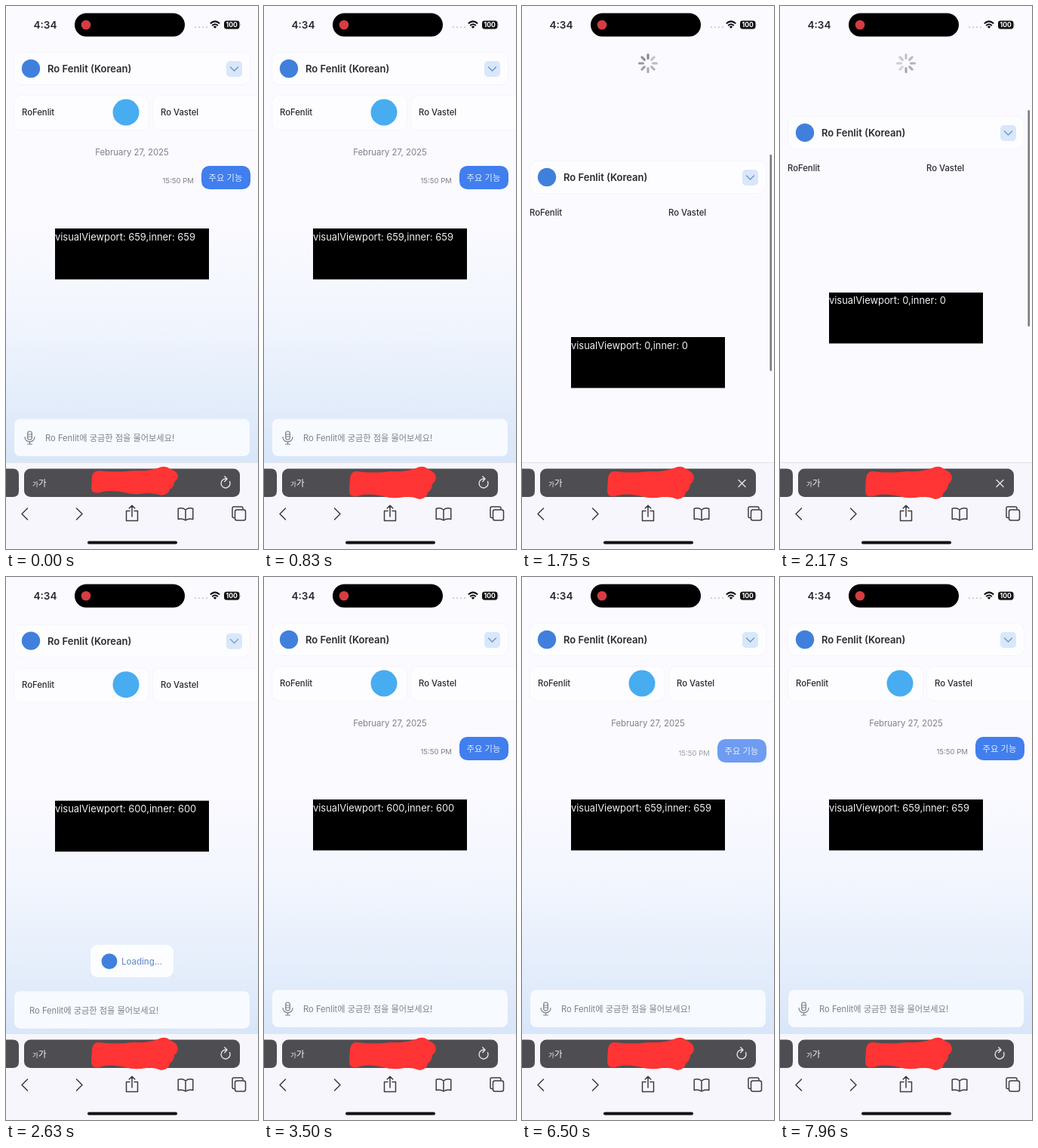
An HTML page for the animation above (8 s loop, 334x720 px).

```html
<!DOCTYPE html>
<html lang="en">
<head>
<meta charset="utf-8">
<title>Pull to refresh</title>
<style>
html, body { margin: 0; width: 100%; height: 100%; overflow: hidden; background: #fafaff; }
svg { display: block; width: 100vw; height: 100vh; }
text { font-family: Inter, "Noto Sans CJK KR", "Noto Sans CJK", sans-serif; fill: #2a2a2e; }
.line { fill: none; stroke: #3c3c40; stroke-width: 1.5; stroke-linecap: round; stroke-linejoin: round; }
.card { fill: #fdfdff; stroke: #f5f5fb; }
.name { font-size: 11.3px; font-weight: 500; }
.muted { fill: #808088; }
</style>
</head>
<body>
<svg viewBox="0 0 334 720">
  <defs>
    <linearGradient id="sky" x1="0" y1="0" x2="0" y2="1">
      <stop offset="0" stop-color="#fafaff"/>
      <stop offset=".35" stop-color="#f3f6fe"/>
      <stop offset=".7" stop-color="#e5eefb"/>
      <stop offset="1" stop-color="#d8e6f9"/>
    </linearGradient>
    <clipPath id="view"><path d="M0 0H334V606H0Z"/></clipPath>
  </defs>

  <g clip-path="url(#view)">
    <g id="spinner" transform="translate(167 76)"></g>
    <g id="page">
      <rect id="backdrop" y="290" width="334" height="316" fill="url(#sky)"/>

      <rect class="card" x="10.5" y="61.5" width="313" height="43" rx="9"/>
      <circle cx="33" cy="83" r="12.2" fill="#4080dc"/>
      <text x="55" y="88" font-size="13" font-weight="600">Ro Fenlit (Korean)</text>
      <rect x="292" y="73" width="21" height="21" rx="5" fill="#d8e7fb"/>
      <path class="line" d="M297.5 81l5 5 5-5" style="stroke:#6f92bd;stroke-width:1.3"/>

      <g id="cards">
        <rect class="card" x="10.5" y="118.5" width="179" height="46" rx="9"/>
        <rect class="card" x="194.5" y="118.5" width="179" height="46" rx="9"/>
        <circle cx="159" cy="141" r="17.5" fill="#48acf0"/>
        <text class="name" x="21" y="145">RoFenlit</text>
        <text class="name" x="205" y="145">Ro Vastel</text>
      </g>
      <g id="bare">
        <text class="name" x="10" y="134">RoFenlit</text>
        <text class="name" x="194" y="134">Ro Vastel</text>
      </g>

      <text id="date" class="muted" x="167" y="198" font-size="11.4" text-anchor="middle">February 27, 2025</text>
      <g id="message">
        <text class="muted" x="249" y="234.5" font-size="9.6" text-anchor="end">15:50 PM</text>
        <rect x="259" y="212" width="65" height="31" rx="10.5" fill="#417eee"/>
        <text x="291" y="232" font-size="11.3" text-anchor="middle" style="fill:#e4eeff">주요 기능</text>
      </g>

      <rect x="65" y="295" width="204" height="67.5"/>
      <text id="size" x="65" y="310.5" font-size="12.9" style="fill:#f0f0f4"></text>

      <g id="loading">
        <rect x="112" y="486" width="110" height="43" rx="10" fill="#fcfdff"/>
        <circle cx="137" cy="508" r="10.4" fill="#4080dc"/>
        <text x="153" y="512" font-size="11.4" font-weight="500" style="fill:#6f93cc">Loading...</text>
      </g>

      <g id="entry">
        <rect x="11" y="547.5" width="312" height="49.5" rx="8" fill="#f7faff"/>
        <g id="mic" class="line" style="stroke:#78808c;stroke-width:1.2">
          <rect x="28.7" y="564" width="5.6" height="11" rx="2.8"/>
          <path d="M25 571.5c0 8.5 13 8.5 13 0M31.5 578v3M28.5 581h6M29 568h5M29 571h5"/>
        </g>
        <text id="hint" class="muted" y="577" font-size="11.2">Ro Fenlit에 궁금한 점을 물어보세요!</text>
      </g>
    </g>
    <rect id="scrollbar" x="328.5" y="197" width="2.5" height="287" rx="1.25" fill="#77777c"/>
  </g>

  <g id="status">
    <text x="52" y="30" font-size="13.6" font-weight="600" text-anchor="middle">4:34</text>
    <rect x="91" y="9.5" width="146" height="31" rx="15.5"/>
    <circle cx="106" cy="25" r="6.3" fill="#d63c42"/>
    <path d="M251 28h16" stroke="#c2c2c8" stroke-width="2" stroke-linecap="round" stroke-dasharray="0 5"/>
    <path class="line" d="M270.8 23.2q6.2-5.6 12.4 0M273.2 26q3.8-3.4 7.6 0" style="stroke:#111;stroke-width:2;stroke-linecap:butt"/>
    <path d="M274.8 27.4q2.2-1.8 4.4 0L277 29.8Z"/>
    <rect x="289" y="19.5" width="20.5" height="11" rx="3.4" fill="#111"/>
    <path d="M310.5 23.2q1.6 1.8 0 3.6Z" fill="#99999f"/>
    <text x="299.2" y="28.2" font-size="8.6" font-weight="700" text-anchor="middle" style="fill:#fff">100</text>
  </g>

  <g id="toolbar">
    <rect y="606" width="334" height="114" fill="#f6f6fc"/>
    <path d="M0 605.5H334" stroke="#e2e4ec"/>
    <path d="M0 613.5H9q8 0 8 8V643q0 8-8 8H0Z" fill="#4e4e52"/>
    <rect x="24" y="613.5" width="286" height="37.5" rx="8.5" fill="#4e4e52"/>
    <text x="35" y="636.5" font-size="8.5" font-weight="500" style="fill:#f2f2f6">가<tspan font-size="11.8">가</tspan></text>
    <path id="scribble" fill="#ff3434" d="M114 626Q115 617 123 617Q145 620 168 617Q189 618 201 613Q211 608 217 614Q228 618 228 626Q227 631 223 634Q223 641 217 645Q216 653 206 654Q196 650 186 651Q170 654 158 650Q136 645 124 650Q113 652 113 643Z"/>
    <g class="line" style="stroke:#e6e6ea;stroke-width:1.4">
      <path id="reload" d="M296.5 630.5a6 6 0 1 1-4.5-3.4h-1.5M289.8 623.8l3.2 3.3-3.2 3.3"/>
      <path id="stop" d="M287 628.5l9 9m0-9l-9 9"/>
    </g>
    <g class="line">
      <path d="M28.5 666l-7.5 7.5 7.5 7.5M93.5 666l7.5 7.5-7.5 7.5"/>
      <path d="M164 669.5h-4.5v13h15v-13H170M167 677v-14.5M163.2 666l3.8-3.8 3.8 3.8"/>
      <path d="M238 668q-4.5-3.5-9.8-1.5v14q5.3-1.5 9.8 1.5 4.5-3 9.8-1.5v-14q-5.3-2-9.8 1.5v14"/>
      <path d="M302.5 678.5h-1q-1.5 0-1.5-1.5v-11q0-2 2-2h10q2 0 2 2v1"/>
      <rect x="303.5" y="668" width="14" height="14" rx="2.5"/>
    </g>
    <rect x="108" y="709.5" width="119" height="4" rx="2" fill="#111"/>
  </g>
</svg>

<script>
const LOOP = 8000;
const PULL_DISTANCE = 144;
// Times of one refresh, counted from the start of the pull.
const PULLED = 420, CLEARED = 450, RELEASED = 850, STYLED = 1000, READY = 1600;
const refreshes = [
  { start: 1200, before: 659, after: 600 },
  { start: 4700, before: 600, after: 659 }
];

const $ = id => document.getElementById(id);
const clamp = x => Math.min(1, Math.max(0, x));
const easeOut = (p, power) => 1 - (1 - p) ** power;
const easeInOut = p => p * p * (3 - 2 * p);
const show = (id, on) => { $(id).style.display = on ? '' : 'none'; };
const move = (id, y) => $(id).setAttribute('transform', `translate(0 ${y})`);

$('spinner').innerHTML = Array.from({ length: 8 }, (_, i) =>
  `<path d="M0-6.5V-11.5" stroke="#77777c" stroke-width="3" stroke-linecap="round" transform="rotate(${i * 45})"/>`
).join('');
const spokes = [...$('spinner').children];

function pullOffset(u) {
  if (u < RELEASED) return PULL_DISTANCE * easeInOut(clamp(u / PULLED));
  return PULL_DISTANCE * (1 - easeOut(clamp((u - RELEASED) / (READY - RELEASED)), 3));
}

function render(t) {
  const run = t < refreshes[1].start ? refreshes[0] : refreshes[1];
  const u = t - run.start;
  const offset = pullOffset(u);
  const bare = u >= CLEARED && u < STYLED;
  const loading = u >= STYLED && u < READY;
  const chat = !bare && !loading;

  move('page', offset);
  show('backdrop', !bare);
  show('cards', !bare);
  show('bare', bare);
  show('entry', !bare);
  show('mic', chat);
  $('hint').setAttribute('x', loading ? 31 : 52);
  show('loading', loading);
  show('date', chat);
  show('message', chat);

  const entrance = u < READY ? 1 : easeOut(clamp((u - READY) / 400), 2);
  move('message', 12 * (1 - entrance));
  $('message').style.opacity = entrance;

  const size = bare ? 0 : u < CLEARED ? run.before : run.after;
  $('size').textContent = `visualViewport: ${size},inner: ${size}`;

  $('spinner').style.opacity = clamp((offset - 35) / 70);
  const head = u < CLEARED ? 0 : Math.floor((u - CLEARED) / 125);
  spokes.forEach((spoke, i) => {
    spoke.style.opacity = 0.9 - ((head - i + 80) % 8) * 0.07;
  });
  $('scrollbar').style.opacity = clamp((offset - 20) / 60);
  move('scrollbar', offset - PULL_DISTANCE);

  show('stop', bare);
  show('reload', !bare);

  // The scribble thickens downwards as the loop opens.
  const thickness = 0.88 + 0.12 * clamp(t / 300);
  $('scribble').setAttribute('transform', `translate(0 ${610 * (1 - thickness)}) scale(1 ${thickness})`);
}

const begin = performance.now();
function tick() {
  render((performance.now() - begin) % LOOP);
  requestAnimationFrame(tick);
}
tick();
</script>
</body>
</html>
```
